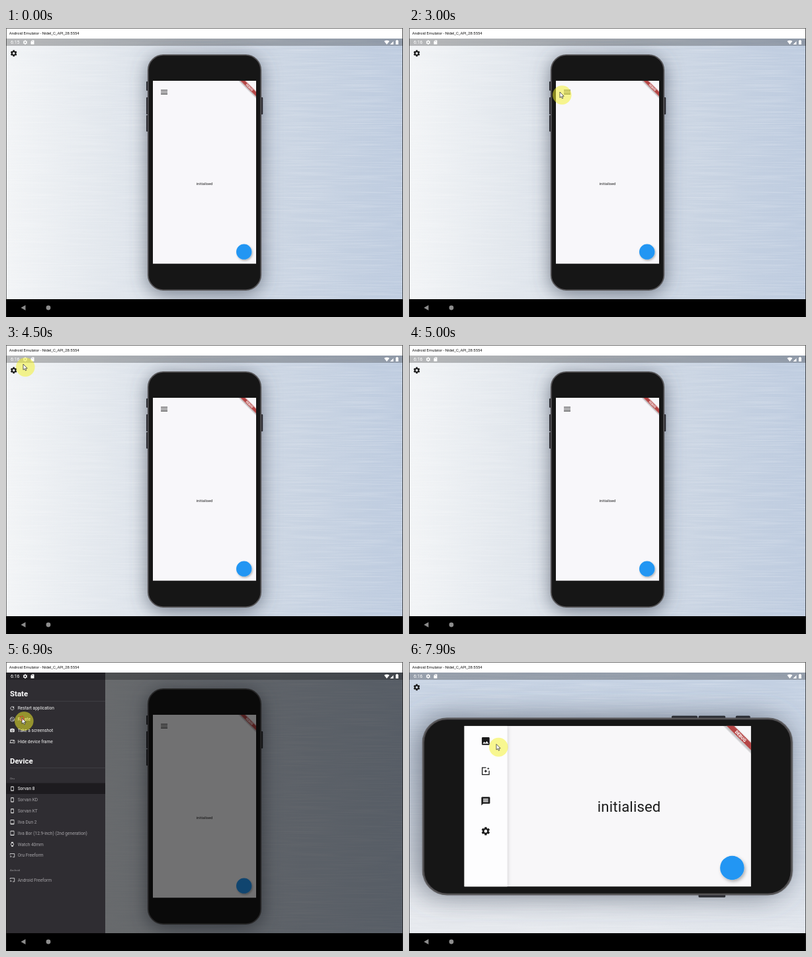
An HTML page for the animation above (8 s loop, 600 by 438 pixels).

```html
<!DOCTYPE html>
<html>
<head>
<meta charset="utf-8">
<style>
html, body { margin: 0; height: 100%; overflow: hidden; background: #000; }
svg { display: block; width: 600px; height: 438px; font-family: Roboto, sans-serif; }
</style>
</head>
<body>
<svg id="stage" viewBox="0 0 600 438"></svg>
<script>
const LOOP = 8000;
const ICONS = {
  gear: `<path d="M19.14 12.94c.04-.3.06-.61.06-.94 0-.32-.02-.64-.07-.94l2.03-1.58c.18-.14.23-.41.12-.61l-1.92-3.32c-.12-.22-.37-.29-.59-.22l-2.39.96c-.5-.38-1.03-.7-1.62-.94l-.36-2.54c-.04-.24-.24-.41-.48-.41h-3.84c-.24 0-.43.17-.47.41l-.36 2.54c-.59.24-1.13.57-1.62.94l-2.39-.96c-.22-.08-.47 0-.59.22L2.74 8.87c-.12.21-.08.47.12.61l2.03 1.58c-.05.3-.09.63-.09.94s.02.64.07.94l-2.03 1.58c-.18.14-.23.41-.12.61l1.92 3.32c.12.22.37.29.59.22l2.39-.96c.5.38 1.03.7 1.62.94l.36 2.54c.05.24.24.41.48.41h3.84c.24 0 .44-.17.47-.41l.36-2.54c.59-.24 1.13-.56 1.62-.94l2.39.96c.22.08.47 0 .59-.22l1.92-3.32c.12-.22.07-.47-.12-.61zM12 15.6a3.6 3.6 0 1 1 0-7.2 3.6 3.6 0 0 1 0 7.2z"/>`,
  image: `<path d="M21 19V5c0-1.1-.9-2-2-2H5c-1.1 0-2 .9-2 2v14c0 1.1.9 2 2 2h14c1.1 0 2-.9 2-2zM8.5 13.5l2.5 3 3.5-4.5 4.5 6H5z"/>`,
  report: `<path d="M13 4H4v16h16v-9" fill="none" stroke="currentColor" stroke-width="2"/>
    <path d="M12 8l1.2 2.8L16 12l-2.8 1.2L12 16l-1.2-2.8L8 12l2.8-1.2zM18 3l.9 2.1L21 6l-2.1.9L18 9l-.9-2.1L15 6l2.1-.9z"/>`,
  message: `<path d="M20 2H4c-1.1 0-2 .9-2 2v18l4-4h14c1.1 0 2-.9 2-2V4c0-1.1-.9-2-2-2zM18 14H6v-2h12zm0-3H6V9h12zm0-3H6V6h12z"/>`,
  menu: `<path d="M3 6h18v2H3zm0 5h18v2H3zm0 5h18v2H3z"/>`,
  restart: `<path d="M18 7a8 8 0 1 0 2 6" fill="none" stroke="currentColor" stroke-width="2.4"/><path d="M20 3v8h-8z"/>`,
  rotate: `<g fill="none" stroke="currentColor" stroke-width="2"><circle cx="12" cy="12" r="10"/><path d="M9 5l10 10-4 4L5 9z"/></g>`,
  camera: `<path d="M9 3 7 5H4a2 2 0 0 0-2 2v11a2 2 0 0 0 2 2h16a2 2 0 0 0 2-2V7a2 2 0 0 0-2-2h-3l-2-2zM12 7.5a5 5 0 1 1 0 10 5 5 0 0 1 0-10z"/><circle cx="12" cy="12.5" r="3"/>`,
  devices: `<path d="M4 17V6h18M0 18.5h14" fill="none" stroke="currentColor" stroke-width="2.6"/><path d="M16 9h7v11h-7z" fill="none" stroke="currentColor" stroke-width="2"/>`,
  phone: `<path d="M7 1h10a2 2 0 0 1 2 2v18a2 2 0 0 1-2 2H7a2 2 0 0 1-2-2V3a2 2 0 0 1 2-2zm0 4v14h10V5z"/>`,
  tablet: `<path d="M5 1h14a2 2 0 0 1 2 2v18a2 2 0 0 1-2 2H5a2 2 0 0 1-2-2V3a2 2 0 0 1 2-2zm0 3v15h14V4z"/>`,
  watch: `<path d="M8 1h8l1 5H7zm0 22h8l1-5H7z"/><circle cx="12" cy="12" r="6.5" fill="none" stroke="currentColor" stroke-width="2.5"/>`,
  cast: `<path d="M2 8V4h20v16h-8M2 19h3M2 14q6 0 6 6" fill="none" stroke="currentColor" stroke-width="2.4"/>`,
  card: `<path d="M10 2h8a2 2 0 0 1 2 2v16a2 2 0 0 1-2 2H6a2 2 0 0 1-2-2V8zm0 3v4h2V5zm3 0v4h2V5z"/>`
};

const icon = (name, cx, cy, size, color) =>
  `<g transform="translate(${cx - size / 2} ${cy - size / 2}) scale(${size / 24})" fill="${color}" color="${color}" fill-rule="evenodd">${ICONS[name]}</g>`;
const rect = (x, y, w, h, fill, extra = '') =>
  `<rect x="${x}" y="${y}" width="${w}" height="${h}" fill="${fill}" ${extra}/>`;
const text = (x, y, size, fill, str, extra = '') =>
  `<text x="${x}" y="${y}" font-size="${size}" fill="${fill}" ${extra}>${str}</text>`;
const gradient = (id, dir, stops) => `<linearGradient id="${id}" ${dir}>` +
  stops.map((c, i) => `<stop offset="${i / (stops.length - 1)}" stop-color="${c}"/>`).join('') + '</linearGradient>';
const shadow = (id, dx, dy, blur, color, opacity) => `<filter id="${id}" x="-40%" y="-40%" width="180%" height="180%">
  <feDropShadow dx="${dx}" dy="${dy}" stdDeviation="${blur}" flood-color="${color}" flood-opacity="${opacity}"/></filter>`;

// App content is laid out in the device's logical pixels.
const fab = (w, h) => `<circle cx="${w - 44}" cy="${h - 44}" r="28" fill="#2196f3" filter="url(#lift)"/>`;
const banner = w => `<g transform="translate(${w} 0) rotate(45)">${rect(-60, 28, 120, 12, '#b54444', 'filter="url(#lift)"')}
  ${text(0, 37.6, 10.2, '#fff', 'DEBUG', 'text-anchor="middle" font-weight="900"')}</g>`;
const ENTRIES = [['image', 'Images'], ['report', 'Reports'], ['message', 'Incidents'], ['gear', 'Settings']];

const portrait = `<g id="portrait" transform="translate(222 80) scale(.416)" clip-path="url(#tall)">
  ${rect(0, 0, 375, 667, '#f8f7fa')}
  ${icon('menu', 41, 41, 32, '#222')}
  ${text(187.5, 379, 14, '#222', 'initialised', 'text-anchor="middle"')}
  ${fab(375, 667)}
  <rect id="drawerScrim" width="375" height="667"/>
  <g id="drawer">${rect(0, 0, 250, 667, '#fff')}
    ${ENTRIES.map(([name, label], i) => icon(name, 38, 41 + 80 * i, 27, '#222') + text(75, 48 + 80 * i, 21, '#222', label)).join('')}
  </g>
  ${banner(375)}</g>`;

const landscape = `<g id="landscape" transform="translate(83.4 96.8) scale(.65)" clip-path="url(#wide)">
  ${rect(0, 0, 667, 375, '#f8f7f9')}
  ${rect(0, 0, 100, 375, '#fdfdfe', 'filter="url(#soft)"')}
  ${ENTRIES.map(([name], i) => icon(name, 50, 35.5 + 70 * i, 24, '#1a1a1a')).join('')}
  ${text(383.5, 199.7, 34, '#1c1c1c', 'initialised', 'text-anchor="middle" letter-spacing=".25"')}
  ${fab(667, 375)}${banner(667)}</g>`;

const body = `<g id="body">
  ${[[212, 81, 14], [212, 105, 26], [212, 132, 25], [384, 105, 26]].map(([x, y, h]) => rect(x, y, 4.2, h, '#19181a', 'rx="1"')).join('')}
  ${rect(214.8, 40.8, 170.4, 356.4, '#171518', 'rx="23" stroke="#565557" stroke-width="1.8" filter="url(#shadow)"')}</g>`;

const row = (name, label, y, color) => icon(name, 9.5, y, 7.8, '#f0f0f0') + text(17.7, y + 2.3, 6.6, color, label);
const ACTIONS = [['restart', 'Restart application'], ['rotate', 'Rotate'], ['camera', 'Take a screenshot'], ['devices', 'Hide device frame']];
const DEVICES = [['phone', 'Sorvan 8'], ['phone', 'Sorvan KD'], ['phone', 'Sorvan KT'], ['tablet', 'Ilva Dun 2'],
  ['tablet', 'Ilva Bor (12.9-inch) (2nd generation)'], ['watch', 'Watch 40mm'], ['cast', 'Oru Freeform']];
const panel = `<g id="panel">${rect(0, 16, 150, 395, '#2f2d32')}
  ${text(6, 52.3, 11.5, '#fff', 'State', 'font-weight="700"')}
  ${text(6, 154, 11.5, '#fff', 'Device', 'font-weight="700"')}
  ${rect(6, 59, 144, .8, '#434146')}${rect(6, 160, 144, .8, '#434146')}
  ${rect(0, 183.5, 150, 16.5, '#1d1b1f')}
  ${ACTIONS.map(([name, label], i) => row(name, label, 70 + 16.8 * i, '#f4f4f4')).join('')}
  ${text(6, 178.3, 4.4, '#99979b', 'Oru')}${text(6, 316.6, 4.4, '#99979b', 'Android')}
  ${DEVICES.map(([name, label], i) => row(name, label, 192 + 16.85 * i, i ? '#a5a3a7' : '#fff')).join('')}
  ${row('cast', 'Android Freeform', 330.3, '#a5a3a7')}</g>`;

const statusBar = `${rect(0, 16, 600, 11, '#000', 'opacity=".25"')}
  <text id="clock" x="7" y="24.2" font-size="7" fill="#fff"></text>
  ${icon('gear', 29, 21.7, 8, '#fff')}${icon('card', 40, 21.7, 7.5, '#fff')}
  <path fill="#fff" d="M571.5 20q4-2.6 8 0l-4 5zM580.5 25l5-5v5zM589 19h1v-.8h2v.8h1v6h-4z"/>`;

const cursor = `<g id="cursor"><circle cx="3.3" cy="4.6" r="14.3" fill="#f3f22a" opacity=".52"/>
  <path d="M0 0V8.6L2 6.8 3.4 9.8 4.8 9.2 3.5 6.3H6.2z" fill="#fff" stroke="#222" stroke-width=".7"/>
  <circle id="click" fill="none" stroke="#e02a2a" stroke-width="1.2" stroke-dasharray="2 1.2"/></g>`;

stage.innerHTML = `<defs>
  ${gradient('across', '', ['#f2f4f6', '#e2e7ed', '#d2dae5', '#c8d3e2', '#bdcbdf'])}
  ${gradient('down', 'x1=".6" x2=".4" y1="0" y2="1"', ['#c3d0e2', '#cfd8e5', '#e6e9ee'])}
  ${shadow('shadow', 0, 5, 14, '#4a5160', .7)}
  ${shadow('lift', 3, 4, 4, '#000', .3)}
  ${shadow('soft', 3, 0, 4, '#000', .12)}
  <filter id="brushed" x="0" y="0" width="100%" height="100%"><feTurbulence type="fractalNoise" baseFrequency=".012 .55" numOctaves="2" seed="4"/>
    <feColorMatrix values="0 0 0 0 1  0 0 0 0 1  0 0 0 0 1  2 0 0 0 -.8"/></filter>
  <clipPath id="tall"><rect width="375" height="667"/></clipPath>
  <clipPath id="wide"><rect width="667" height="375"/></clipPath>
  <clipPath id="app"><rect y="16" width="600" height="395"/></clipPath></defs>
  <g clip-path="url(#app)"><rect id="wall" y="16" width="600" height="395"/>
    ${rect(0, 16, 600, 395, '#fff', 'filter="url(#brushed)" opacity=".22"')}
    ${icon('gear', 11.7, 38.4, 12, '#151515')}
    ${body}${portrait}${landscape}
    <rect id="scrim" y="16" width="600" height="395"/>${panel}${statusBar}</g>
  ${rect(0, 0, 600, 16, '#fff')}
  ${text(4.7, 10.2, 5.9, '#111', 'Android Emulator - Nidel_C_API_28:5554')}
  ${rect(0, 411, 600, 27, '#000')}
  <path d="M29.5 420v8l-7-4z" fill="#8d8d8d"/><circle cx="64" cy="424" r="3.4" fill="#8d8d8d"/>
  <path d="M.3 438V.3H599.5V438" fill="none" stroke="#222" stroke-width=".8"/>
  ${cursor}`;

const $ = id => document.getElementById(id);
const set = (id, attrs) => { for (const k in attrs) $(id).setAttribute(k, attrs[k]); };
const show = (id, on) => set(id, { display: on ? 'inline' : 'none' });
const ramp = (t, from, to) => {
  const p = Math.min(1, Math.max(0, (t - from) / (to - from)));
  return p * p * (3 - 2 * p);
};

// Cursor tip: time, x, y
const PATH = [[1100, 625, 250], [1700, 190.5, 150], [2200, 13, 34], [2700, 15, 36], [3000, 228, 97], [3150, 236, 96],
  [3400, 236, 96], [3850, 269, 101], [4100, 268, 100], [4500, 26, 29], [4700, -25, 29], [5450, -25, 12], [5580, 8, 15],
  [5700, 11, 36], [5850, 11, 36], [6300, 29, 86], [6500, 19, 81], [6700, 24, 85], [6980, 24, 85],
  [7220, 180, 132], [7450, 175, 130], [7900, 132, 124.5]];
const CLICKS = [3220, 4000, 5740, 6850, 7260];

function cursorAt(t) {
  const i = PATH.findIndex(p => p[0] > t);
  if (i < 0) return PATH[PATH.length - 1].slice(1);
  const [a, b] = [PATH[Math.max(0, i - 1)], PATH[i]];
  const k = ramp(t, a[0], b[0]);
  return [a[1] + (b[1] - a[1]) * k, a[2] + (b[2] - a[2]) * k];
}

function draw(now) {
  const t = now % LOOP;
  const wide = t >= 7050;
  const drawerOpen = ramp(t, 3270, 3520) - ramp(t, 4050, 4300);
  const panelOpen = ramp(t, 5780, 6030) - ramp(t, 7280, 7530);
  const click = CLICKS.find(c => t >= c && t < c + 150);

  $('clock').textContent = t < 1000 ? '6:15' : '6:16';
  set('wall', { fill: `url(#${wide ? 'down' : 'across'})` });
  set('body', { transform: wide ? 'translate(300 219) rotate(90) scale(1.563) translate(-300 -219)' : '' });
  show('portrait', !wide);
  show('landscape', wide);
  set('drawer', { transform: `translate(${-250 * (1 - drawerOpen)})` });
  set('drawerScrim', { opacity: .54 * drawerOpen });
  set('panel', { transform: `translate(${-150 * (1 - panelOpen)})` });
  set('scrim', { opacity: .54 * panelOpen });
  set('cursor', { transform: `translate(${cursorAt(t)})` });
  show('click', click);
  set('click', { r: 1.8 + (t - (click || t)) / 50 });
  requestAnimationFrame(() => draw(performance.now()));
}
draw(performance.now());
</script>
</body>
</html>
```
